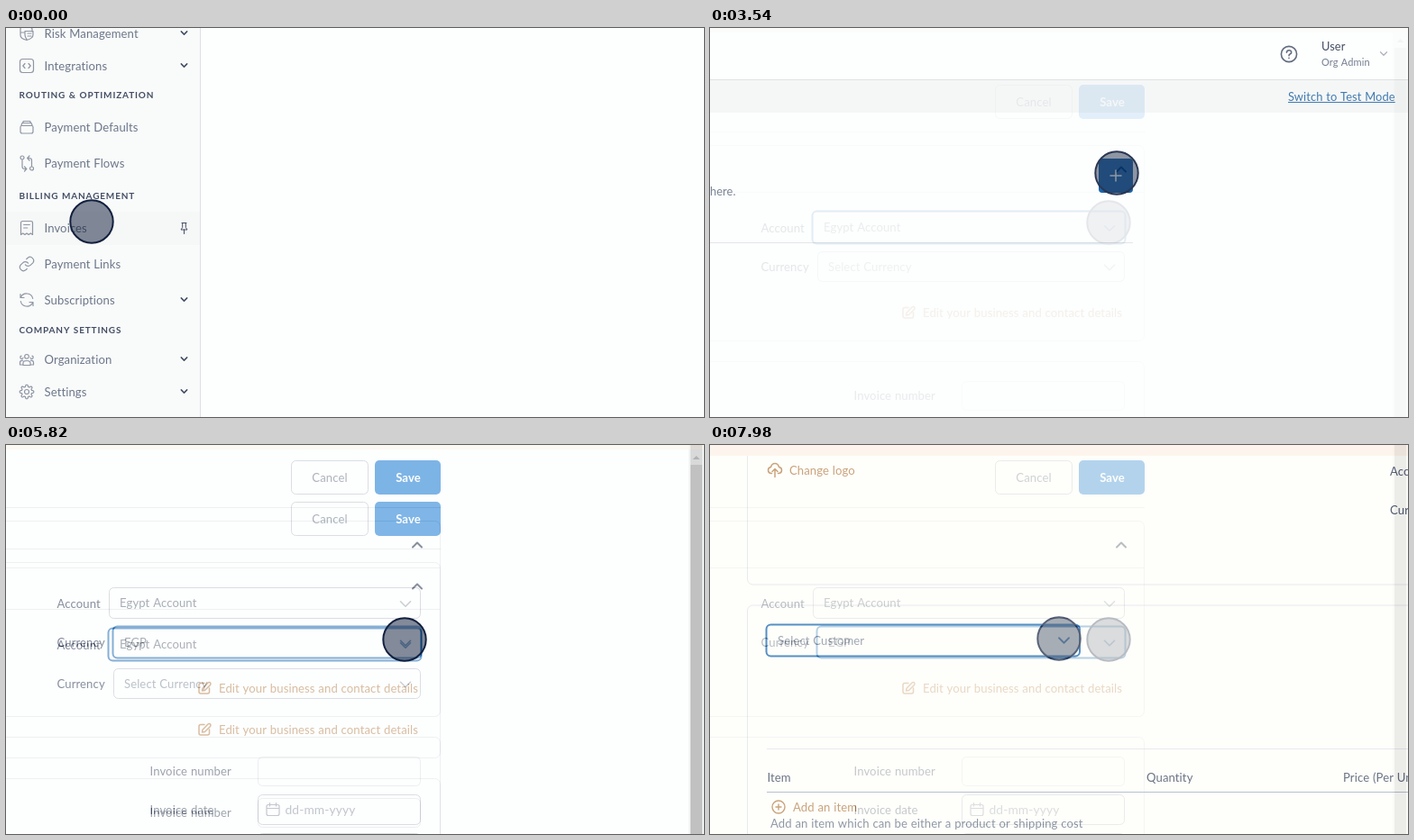
An HTML page with a canvas for the animation above (8000 ms loop, 774 by 432 pixels).

```html
<!DOCTYPE html>
<html lang="en">
<head>
<meta charset="utf-8">
<title>Create an invoice</title>
<style>
html, body { margin: 0; width: 774px; height: 432px; overflow: hidden; background: #fdfefe; }
canvas { display: block; }
</style>
</head>
<body>
<canvas id="stage" width="774" height="432"></canvas>
<script>
const W = 774, H = 432, LOOP = 8000, STEP = 60;
const FADES = [1500, 3540, 5580, 7620];
const C = {
  page: '#fdfefe', nav: '#6c7789', head: '#434e64', ink: '#2f3b52', dark: '#14213f',
  grey: '#7a8594', line: '#e0e3e7', edge: '#b9bfc8', blue: '#006dd0', focus: '#0f62ae',
  amber: '#b57d45', icon: '#8f97a3', cream: '#fcf2e7'
};
let g;

function text(s, x, y, color, o = {}) {
  const size = o.size || 13.1;
  g.font = `${o.weight || 400} ${size}px Lato, "Open Sans", sans-serif`;
  g.letterSpacing = (o.gap || 0.1) + 'px';
  g.wordSpacing = '0.3px';
  g.textAlign = o.align || 'left';
  g.fillStyle = color;
  g.fillText(s, x, y + size * 0.35);
  return g.measureText(s).width;
}

function rect(x, y, w, h, color) {
  g.fillStyle = color;
  g.fillRect(x, y, w, h);
}

function box(x, y, w, h, r, stroke, width = 1, fill) {
  g.beginPath();
  g.roundRect(x, y, w, h, r);
  if (fill) { g.fillStyle = fill; g.fill(); }
  if (stroke) { g.strokeStyle = stroke; g.lineWidth = width; g.stroke(); }
}

// Strokes a path whose origin sits at x, y.
function mark(d, x, y, color, width = 1.2, scale = 1) {
  g.save();
  g.translate(x, y);
  g.scale(scale, scale);
  g.lineCap = g.lineJoin = 'round';
  g.strokeStyle = color;
  g.lineWidth = width / scale;
  g.stroke(new Path2D(d));
  g.restore();
}

const chevron = (x, y, color, size = 5, width = 1.6, dir = 1) =>
  mark(`M${-size} ${-size * dir / 2}L0 ${size * dir / 2}L${size} ${-size * dir / 2}`, x, y, color, width);

function pointer(x, y) {
  g.beginPath();
  g.arc(x, y, 23.7, 0, Math.PI * 2);
  g.fillStyle = 'rgba(14,28,58,.51)';
  g.fill();
  g.strokeStyle = '#12203f';
  g.lineWidth = 2;
  g.stroke();
}

function gear() {
  let d = '';
  for (let i = 0; i < 96; i++) {
    const a = i / 96 * Math.PI * 2;
    const r = 6.7 + 1.1 * Math.tanh(2.2 * Math.cos(8 * a));
    d += (i ? 'L' : 'M') + (r * Math.cos(a)).toFixed(2) + ' ' + (r * Math.sin(a)).toFixed(2);
  }
  return d + 'ZM2.5 0a2.5 2.5 0 1 1-5 0a2.5 2.5 0 1 1 5 0';
}

const ICONS = {
  risk: 'M-7-5q0-2.5 6-2.5t7 2.5v3M-7-5v7q0 4 7 5.5q7-2 7-6v-4h-9v4q0 3 2 5M-7-1h4M1 0h4M1 3h4',
  code: 'M-4.5-7.5h9q3 0 3 3v9q0 3-3 3h-9q-3 0-3-3v-9q0-3 3-3ZM-2-2.5L-4.2 0l2.2 2.5M2-2.5L4.2 0l-2.2 2.5',
  cards: 'M-5.5-1.5h11q1.5 0 1.5 1.5v5q0 2-2 2h-10q-2 0-2-2v-5q0-1.5 1.5-1.5ZM-6-2l1-2.5h10l1 2.5M-4.5-4.5l.8-2h7.4l.8 2',
  flow: 'M-3-6a2 2 0 1 1-4 0a2 2 0 1 1 4 0M7.5 6a2 2 0 1 1-4 0a2 2 0 1 1 4 0M-5-4V4q0 2.5 2.5 2.5h2M-2.5 4l2.3 2.5l-2.3 2.5M5.5 4V-3q0-2.5-2.5-2.5H1M3-8L.7-5.5L3-3',
  bill: 'M-6.5 7.5V-5.5q0-2 2-2h9q2 0 2 2V7.5l-2.2-1.6l-2.2 1.6l-2.1-1.6l-2.1 1.6l-2.2-1.6ZM-3.3-3.5h6.6M-3.3 0h4',
  link: 'M-2 1a5 5 0 0 0 7.5.5l3-3a5 5 0 0 0-7-7l-1.8 1.7M2-1a5 5 0 0 0-7.5-.5l-3 3a5 5 0 0 0 7 7l1.8-1.7',
  cycle: 'M-7-6.5v4h4M7 6.5v-4h-4M-6.5-3a7 7 0 0 1 13.2 1.5M6.5 3a7 7 0 0 1-13.2-1.5',
  people: 'M2.3-3.2a2.3 2.3 0 1 1-4.6 0a2.3 2.3 0 1 1 4.6 0M-4 6.5V4q0-2.5 4-2.5t4 2.5v2.5ZM-4-2a1.6 1.6 0 1 1-2-1.8M4-2a1.6 1.6 0 1 0 2-1.8M-4.5 1.2q-3 0-3 2.3v2.5h3M4.5 1.2q3 0 3 2.3v2.5h-3',
  gear: gear(),
  pin: 'M-2.5-5.5h5M-1.8-5.5v5l-1.7 2.5h7l-1.7-2.5v-5M0 2v4.5',
  edit: 'M0-5.5h-4q-2 0-2 2v7.5q0 2 2 2h7.5q2 0 2-2V0M-2 .2L4-6q1.5-1 2.5 0t0 2.5L.5 2.5L-2.5 3Z',
  date: 'M-5-5.5h10q2 0 2 2v8q0 2-2 2h-10q-2 0-2-2v-8q0-2 2-2ZM-7-1.5h14M-3.5-7.5v3.5M3.5-7.5v3.5',
  upload: 'M-3.5 3.5h-1q-3-.5-3-3.5t3-3.5q1-4 4.5-4t4.5 4q3 .5 3 3.5t-3 3.5h-1M0 7.5V-1.5M-3 1.5l3-3l3 3',
  add: 'M7 0a7 7 0 1 1-14 0a7 7 0 1 1 14 0M-3 0h6M0-3v6',
  help: 'M8.6 0a8.6 8.6 0 1 1-17.2 0a8.6 8.6 0 1 1 17.2 0M-2.6-1.8q.3-2.4 2.7-2.4t2.6 2.2q0 1.4-1.6 2.1q-1.1.5-1.1 1.6M0 4.2v.2'
};

// Icon, label, y, expandable
const MENU = [
  ['risk', 'Risk Management', 6, 1], ['code', 'Integrations', 42, 1],
  ['cards', 'Payment Defaults', 110], ['flow', 'Payment Flows', 150],
  ['bill', 'Invoices', 222], ['link', 'Payment Links', 262], ['cycle', 'Subscriptions', 302, 1],
  ['people', 'Organization', 368, 1], ['gear', 'Settings', 404, 1]
];
const GROUPS = [['ROUTING & OPTIMIZATION', 74], ['BILLING MANAGEMENT', 186], ['COMPANY SETTINGS', 335]];

function sidebar() {
  rect(0, 0, 215, H, '#f9fafa');
  rect(0, 204, 215, 37, '#f6f7f7');
  rect(215, 0, 1, H, '#dde1e4');
  for (const [icon, label, y, open] of MENU) {
    mark(ICONS[icon], 23, y, C.icon, 1.2, icon === 'link' ? 0.8 : 1);
    text(label, 42.5, y, C.nav);
    if (open) chevron(197.5, y - 0.5, C.head, 3.2, 1.5);
  }
  for (const [label, y] of GROUPS) text(label, 14.5, y, C.head, { size: 10, weight: 700, gap: 0.85 });
  mark(ICONS.pin, 197.5, 222, C.head, 1);
  pointer(95, 215);
}

function listPage() {
  rect(0, 57, W, 1, '#dcdfe2');
  rect(0, 58, W, 36, '#f5f7f7');
  mark(ICONS.help, 642, 29, '#4f5b70', 1.6);
  text('User', 678, 21, C.ink, { size: 12.8 });
  text('Org Admin', 678, 38, '#657084', { size: 11 });
  chevron(747, 28.5, '#a3a9b3', 3.5, 1.2);
  const w = text('Switch to Test Mode', 641, 76, '#2c6ba6', { size: 12.9 });
  rect(641, 82, w, 1, '#2c6ba6');
  text('here.', 0, 182, C.nav, { size: 12.8 });
  rect(0, 238, 469, 1, C.line);
  box(431, 145, 38, 38, 4, null, 0, '#00529f');
  mark('M-6 0h12M0-6v12', 450, 164, '#fff', 1.5);
  pointer(451, 161);
}

function select(x, y, h, label, active, color) {
  if (active) box(x - 0.5, y - 0.5, 461 - x, h + 1, 5, C.focus, 2);
  else box(x + 0.5, y + 0.5, 459 - x, h - 1, 5, C.edge);
  text(label, x + 12, y + h / 2, color);
  chevron(443, y + h / 2 + 1, active ? '#1c64a6' : '#9aa2ae', 5.5, 1.6);
}

function form(top, chosen) {
  box(316.5, top + 0.5, 85, 37, 5, C.edge);
  text('Cancel', 359, top + 19, '#5f6b7d', { align: 'center' });
  box(409, top, 73, 38, 5, null, 0, C.blue);
  text('Save', 446, top + 19, '#fff', { weight: 700, align: 'center' });
  rect(0, top + 52, 482, 1, C.line);

  box(-20.5, top + 67.5, 502, 217, 6, C.line);
  rect(0, top + 119, 481, 1, C.line);
  chevron(456, top + 94, C.dark, 5, 2, -1);
  text('Account', 56.5, top + 159, C.dark);
  select(114, top + 141, 35, 'Egypt Account', !chosen, '#56616f');
  text('Currency', 56.5, top + 202, C.dark);
  select(119, top + 185, 34, chosen ? 'EGP' : 'Select Currency', chosen, chosen ? '#56616f' : C.grey);
  mark(ICONS.edit, 220, top + 253, C.amber, 1.5);
  text('Edit your business and contact details', 236, top + 253, C.amber);

  box(-20.5, top + 307.5, 502, 300, 6, C.line);
  text('Invoice number', 159.5, top + 345, '#3f4a5e');
  box(279.5, top + 329.5, 180, 32, 5, '#dcdfe4');
  text('Invoice date', 159.5, top + 388, '#3f4a5e');
  box(279.5, top + 371.5, 180, 33, 5, C.edge);
  mark(ICONS.date, 296, top + 388, '#8b94a1', 1.2);
  text('dd-mm-yyyy', 309.5, top + 388, '#88919e', { size: 13.8 });
  box(279.5, top + 414.5, 180, 33, 5, C.edge);

  rect(757, 0, 17, H, '#f1f2f2');
  rect(759, chosen ? 0 : 22, 13, H, '#c1c1c1');
  if (!chosen) {
    rect(0, 0, W, 5, C.cream);
    g.fillStyle = '#a3a3a3';
    g.fill(new Path2D('M761.5 16l4-4l4 4Z'));
  }
  pointer(442, 216);
}

function itemsPage() {
  rect(0, 0, W, H, '#fffffa');
  box(41.5, -20, 800, 175, 6, C.line);
  box(41.5, 178, 800, 400, 6, C.line);
  rect(0, 0, W, 12, '#fef2e6');
  mark(ICONS.upload, 72, 28, C.amber, 1.5);
  text('Change logo', 88, 28, C.amber);
  text('Account', 754, 29, C.dark);
  text('Currency', 754, 72, C.dark);
  box(62.5, 199.5, 347.5, 35, 5, C.focus, 2);
  text('Select Customer', 75, 217, C.grey);
  chevron(392.5, 217, '#1c64a6', 5.5, 1.8);
  rect(63, 337, W, 1, C.line);
  text('Item', 63.5, 369, C.ink);
  text('Quantity', 484, 369, C.ink);
  text('Price (Per Unit)', 702, 369, C.ink);
  rect(63, 385, W, 1, '#9aa8bb');
  mark(ICONS.add, 76, 402, C.amber, 1.4);
  text('Add an item', 92, 402, C.amber);
  text('Add an item which can be either a product or shipping cost', 67, 420, '#626e80');
  pointer(387, 215);
}

function render(draw) {
  const layer = document.createElement('canvas');
  layer.width = W;
  layer.height = H;
  g = layer.getContext('2d');
  rect(0, 0, W, H, C.page);
  draw();
  return layer;
}

const scenes = [sidebar, listPage, () => form(63, false), () => form(17, true), itemsPage].map(render);
const stage = document.getElementById('stage').getContext('2d');

function frame() {
  const t = performance.now() % LOOP;
  const n = FADES.filter(start => t >= start).length;
  const mix = n ? Math.min(1, (Math.floor((t - FADES[n - 1]) / STEP) + 1) / 10) : 1;
  stage.globalAlpha = 1;
  stage.drawImage(scenes[Math.max(0, n - 1)], 0, 0);
  stage.globalAlpha = mix;
  stage.drawImage(scenes[n], 0, 0);
  requestAnimationFrame(frame);
}
frame();
</script>
</body>
</html>
```
